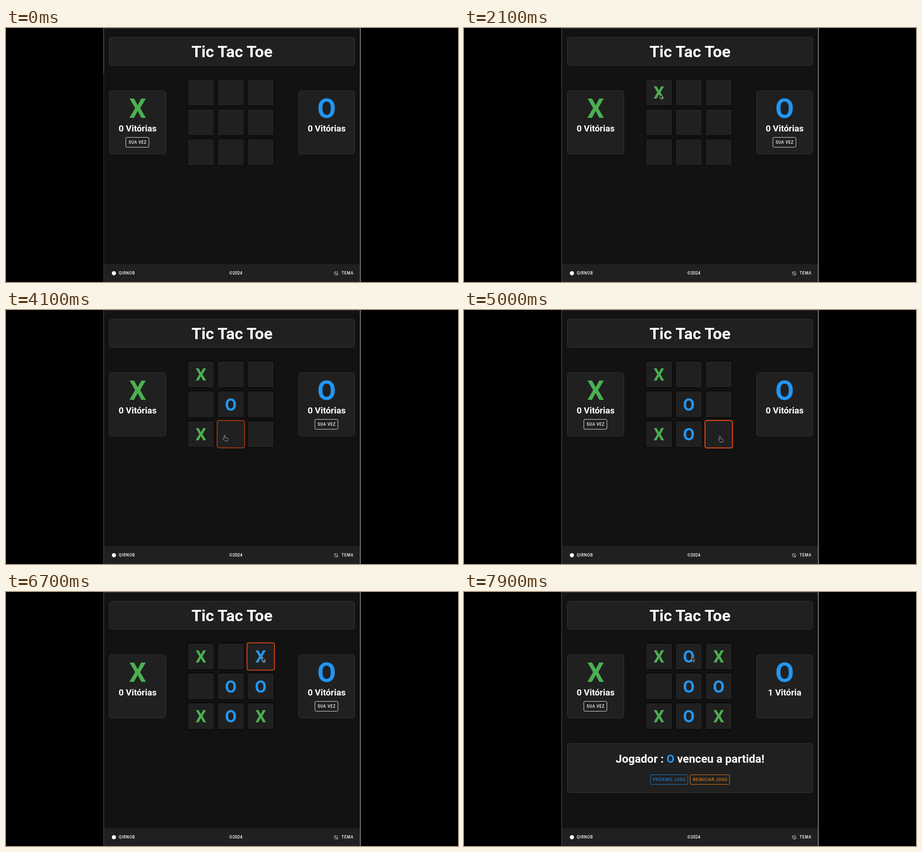
An HTML page for the animation above (8 s loop, 960 by 540 pixels).

```html
<!DOCTYPE html>
<html lang="pt-BR">
<head>
<meta charset="utf-8">
<title>Tic Tac Toe</title>
<style>
  html, body { margin: 0; width: 100%; height: 100%; overflow: hidden; background: #000; }
  svg { display: block; width: 960px; height: 540px; }
  text { font-family: Roboto, sans-serif; font-weight: 700; fill: #fff; }
  .mid { text-anchor: middle; }
  .panel { fill: #202020; stroke: #343434; }
  .label { font-size: 8.3px; font-weight: 500; letter-spacing: .74px; }
  .btn rect { fill: none; stroke: #ddd; }
  .blue rect { stroke: #2180d2; }
  .blue text { fill: #2180d2; }
  .orange rect { stroke: #e57c14; }
  .orange text { fill: #e57c14; }
  .big { font-size: 57px; }
  .score { font-size: 18.7px; }
  .mark { font-size: 36px; }
  #cursor path { fill: #1c1c1c; stroke: #b0b0b0; stroke-width: .9; stroke-linejoin: round; }
</style>
</head>
<body>
<svg viewBox="0 0 960 540">
  <rect x="207" width="546" height="540" fill="#121212"/>
  <rect x="208" y="502" width="544" height="38" fill="#202020"/>
  <rect x="207" width="546" height="1" fill="#444"/>
  <rect x="752" width="1" height="540" fill="#d0d0d0"/>
  <g id="edgeIdle">
    <rect x="207" width="1" height="97" fill="#777"/>
    <rect x="207" y="97" width="1" height="443" fill="#3a3a3a"/>
  </g>
  <rect id="edgeActive" x="207" width="1" height="540" fill="#48605f"/>

  <rect class="panel" x="219.5" y="19.5" width="521" height="60" rx="5"/>
  <text class="mid" x="480" y="62" font-size="34">Tic Tac Toe</text>

  <rect class="panel" x="219.5" y="133.5" width="120" height="134.5" rx="5"/>
  <text class="mid big" x="279.5" y="191" style="fill:#4caf50">X</text>
  <text class="mid score" x="279.5" y="220">0 Vitórias</text>
  <g class="btn" id="turnX">
    <rect x="254.5" y="232.5" width="49" height="21" rx="2.5"/>
    <text class="label" x="260.6" y="246">SUA VEZ</text>
  </g>

  <rect class="panel" x="621.5" y="133.5" width="119" height="134.5" rx="5"/>
  <text class="mid big" x="681" y="191" style="fill:#2196f3">O</text>
  <text class="mid score" id="scoreO" x="681" y="220">0 Vitórias</text>
  <g class="btn" id="turnO">
    <rect x="656" y="232.5" width="49" height="21" rx="2.5"/>
    <text class="label" x="662" y="246">SUA VEZ</text>
  </g>

  <g id="board"></g>

  <g id="result">
    <rect class="panel" x="219.5" y="322" width="521" height="104.5" rx="5"/>
    <text class="mid" x="480" y="363" font-size="24">Jogador : <tspan fill="#2196f3">O</tspan> venceu a partida!</text>
    <g class="btn blue">
      <rect x="396" y="388.5" width="79.5" height="20.5" rx="2.5"/>
      <text class="label" x="401.6" y="402">PRÓXIMO JOGO</text>
    </g>
    <g class="btn orange">
      <rect x="480.5" y="388.5" width="83.5" height="20.5" rx="2.5"/>
      <text class="label" x="486.4" y="402">REINICIAR JOGO</text>
    </g>
  </g>

  <circle cx="229.2" cy="521.3" r="4.4" fill="#fff"/>
  <text class="label" x="239.6" y="524.3">QIRNOB</text>
  <text class="mid" x="488" y="524.2" style="font-size:9.2px;font-weight:500">©2024</text>
  <path d="M699.6 517.6 A4.2 4.2 0 1 0 705.4 523.2 A5.4 5.4 0 0 1 699.6 517.6 Z" fill="none" stroke="#eee"/>
  <path d="M703.4 517.2 v2.2 M702.3 518.3 h2.2 M705 520 v1.4" stroke="#eee" stroke-width=".8"/>
  <text class="label" x="712.8" y="524.3">TEMA</text>

  <g id="cursor">
    <path id="arrow" d="M0 0 V10 L2.2 8 L3.8 11.5 L5.2 10.9 L3.8 7.4 H6.8 Z"/>
    <path id="hand" d="M-1.2 7 V.6 a1.2 1.2 0 0 1 2.4 0 V5 l4.4 .9 q1.5 .4 1.3 2 L6.2 12.2 H.2 L-3.6 7.8 q.2 -1.6 1.4 -1 L-1.2 7.6 Z"/>
  </g>
</svg>
<script>
const LOOP = 8000, STEP = 100, FADE = 300;
const BLUE = [33, 150, 243], GREEN = [76, 175, 80], BLACK = [5, 5, 5], ORANGE = [232, 74, 20];
const ENTRY = { x: 212, y: 330 };

// Each turn: cell, pointer spot, travel start and end, hover start, click
const turns = [
  [0, 416, 140.5, 600, 1600, 1100, 1800],
  [4, 462, 208.5, 2150, 2550, 2400, 2700],
  [6, 417, 268, 3000, 3350, 3200, 3500],
  [7, 464.5, 266.3, 3650, 4000, 3900, 4400],
  [8, 543.5, 268.5, 4500, 4850, 4700, 5200],
  [5, 545, 204, 5400, 5750, 5600, 5900],
  [2, 544.5, 138, 6100, 6450, 6250, 6650],
  [1, 484, 137.5, 6900, 7250, 7100, 7500]
].map(([cell, x, y, from, to, enter, click], i) =>
  ({ cell, x, y, from, to, enter, click, mark: i % 2 ? 'O' : 'X' }));
const WIN = turns[7].click;

const $ = id => document.getElementById(id);
const show = (id, on) => { $(id).style.display = on ? '' : 'none'; };
const clamp = v => Math.max(0, Math.min(1, v));
const smooth = v => v * v * (3 - 2 * v);
const easeOut = v => 1 - (1 - v) ** 3;
const ramp = (t, start, span) => clamp((t - start) / span);
const fade = (t, start) => smooth(ramp(t, start, FADE));
const lerp = (a, b, k) => a + (b - a) * k;
const mix = (a, b, k) => `rgb(${a.map((v, i) => Math.round(lerp(v, b[i], k)))})`;

function add(tag, attrs) {
  const el = document.createElementNS('http://www.w3.org/2000/svg', tag);
  for (const k in attrs) el.setAttribute(k, attrs[k]);
  return $('board').appendChild(el);
}

const cells = Array.from({ length: 9 }, (_, i) => {
  const x = 414 + i % 3 * 63.5, y = 137 + Math.floor(i / 3) * 63.5;
  return {
    x, y,
    box: add('rect', { fill: '#202020' }),
    text: add('text', { class: 'mid mark', x, y: y + 13 }),
    turn: turns.find(m => m.cell === i)
  };
});

function drawCell({ x, y, box, text, turn }, t) {
  const glow = turn ? fade(t, turn.enter) * (1 - fade(t, turn.click)) : 0;
  const half = lerp(28.5, 29.2, glow);
  const attrs = {
    x: x - half, y: y - half, width: 2 * half, height: 2 * half, rx: 4,
    stroke: mix(BLACK, ORANGE, glow), 'stroke-width': lerp(1.3, 1.9, glow)
  };
  for (const k in attrs) box.setAttribute(k, attrs[k]);
  const placed = turn && t >= turn.click;
  text.textContent = placed ? turn.mark : '';
  if (placed) text.style.fill = mix(BLUE, turn.mark === 'X' ? GREEN : BLUE, fade(t, turn.click));
}

function drawCursor(t) {
  let { x, y } = ENTRY;
  turns.forEach((m, i) => {
    const k = (i ? smooth : easeOut)(ramp(t, m.from, m.to - m.from));
    x = lerp(x, m.x, k);
    y = lerp(y, m.y, k);
  });
  const pointing = turns.some(m => t >= m.enter && t < m.click);
  $('cursor').setAttribute('transform', `translate(${x} ${y})`);
  show('cursor', t >= turns[0].from);
  show('hand', pointing);
  show('arrow', !pointing);
}

function draw(t) {
  const active = t >= turns[0].from;
  const xTurn = turns.filter(m => t >= m.click).length % 2 === 0;
  show('edgeIdle', !active);
  show('edgeActive', active);
  show('turnX', xTurn);
  show('turnO', !xTurn);
  show('result', t >= WIN);
  $('scoreO').textContent = t >= WIN ? '1 Vitória' : '0 Vitórias';
  cells.forEach(c => drawCell(c, t));
  drawCursor(t);
}

const start = performance.now();
function tick() {
  const t = (performance.now() - start) % LOOP;
  draw(Math.floor(t / STEP) * STEP);
  requestAnimationFrame(tick);
}
tick();
</script>
</body>
</html>
```
